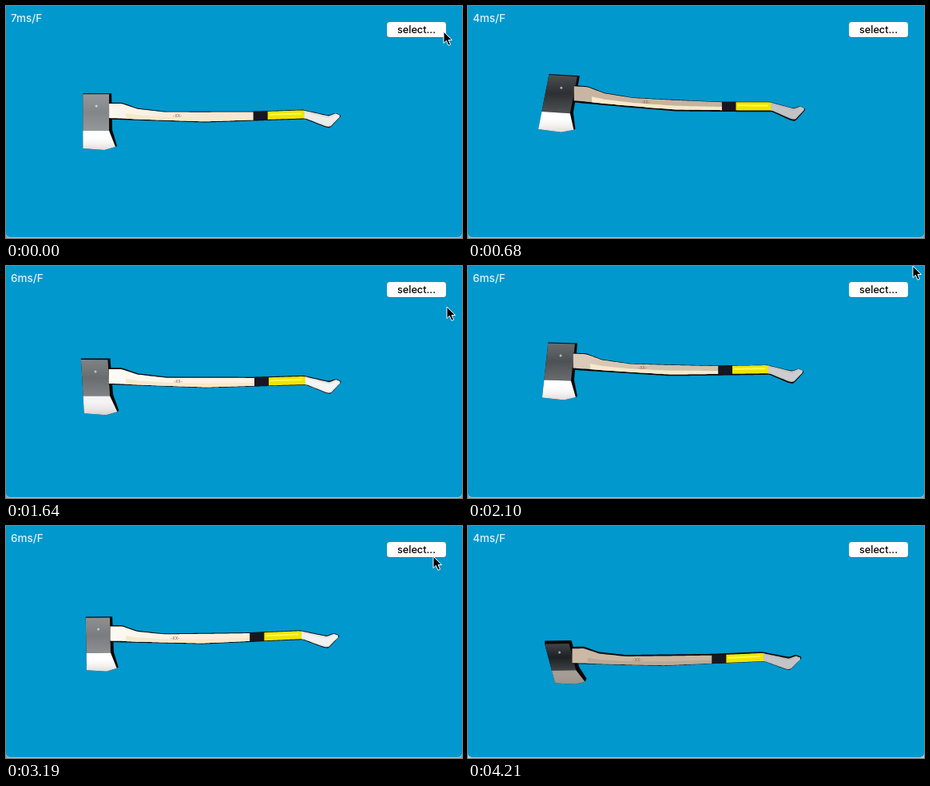
Animation, 571 px wide and 290 px high, one loop 4.26 s. Source, as an HTML page with a canvas:

```html
<!DOCTYPE html>
<html lang="en">
<head>
<meta charset="utf-8">
<title>Axe viewer</title>
<style>
  html, body { margin: 0; width: 100%; height: 100%; overflow: hidden; background: #8fa3ab; }
  #stage { position: relative; width: 571px; height: 290px; overflow: hidden; font: 500 13.5px/20px Inter, sans-serif; }
  #view { position: absolute; inset: 0 0 1px; background: #0098cd; border-radius: 0 0 5px 5px; box-shadow: 0 1px #b4c6ce; }
  canvas, svg { position: absolute; left: 0; top: 0; }
  #rate { position: absolute; left: 6px; top: 5px; color: #e2f3fa; }
  #select { position: absolute; left: 477px; top: 20px; width: 74px; height: 19px; border-radius: 3.5px;
    background: #fff; box-shadow: 0 .5px .5px #0005; color: #000; font-size: 12.7px; line-height: 19px; text-align: center; }
</style>
</head>
<body>
<div id="stage">
  <div id="view"></div>
  <canvas id="axe" width="571" height="290"></canvas>
  <div id="rate"></div>
  <div id="select">select...</div>
  <svg id="cursor" width="14" height="20" viewBox="-1 -1 14 20">
    <path d="M0 0V14.5L3.4 11.4L6 17.3L8.6 16.2L6.1 10.5H10.6Z" fill="#000" stroke="#fff"/>
  </svg>
</div>
<script>
const LOOP = 4260, STEP = 56.7;
const byId = id => document.getElementById(id);
const ctx = byId('axe').getContext('2d');

const clamp = (v, low = 0, high = 1) => Math.max(low, Math.min(high, v));
const mix = (a, b, k) => Array.isArray(a) ? a.map((v, i) => mix(v, b[i], k)) : a + (b - a) * k;
const rgb = hex => [0, 2, 4].map(i => parseInt(hex.substr(i, 2), 16));
const css = c => `rgb(${c.map(Math.round)})`;
const bump = (v, center, width) => Math.exp(-(((v - center) / width) ** 2));
const WHITE = rgb('ffffff');

// Key points of the pointer path: [step, [x, y]]. The axe turns with the pointer.
const pointer = [
  [0, [549, 32]], [11, [571, -30]], [13, [571, -30]], [20, [554, 46]], [25, [551, 74]], [29, [553, 51]],
  [37, [558, 0]], [40, [562, -18]], [49, [512, 19]], [59, [546, 46]], [63, [540, 111]], [69, [536, 295]]
];
const rates = [[0, 7], [11, 4], [18, 6], [45, 5], [55, 6], [68, 4]];

// Edges of the handle at rest, as [x, y].
const upper = [[129, 121], [145, 121], [165, 128], [200, 132], [310, 132], [372, 130], [404, 137], [413, 134], [419, 137]];
const lower = [[129, 141], [190, 143], [250, 145], [310, 143], [375, 141], [400, 151], [406, 152], [419, 138]];

function sample(table, at) {
  const next = table.findIndex(row => row[0] > at);
  if (next < 0) return table[table.length - 1][1];
  const [a, b] = [table[next - 1], table[next]];
  return mix(a[1], b[1], (at - a[0]) / (b[0] - a[0]));
}

function polygon(points, fill) {
  ctx.beginPath();
  points.forEach(p => ctx.lineTo(...p));
  ctx.closePath();
  ctx.fillStyle = fill;
  ctx.fill();
}

function gradient(x0, y0, x1, y1, ...colors) {
  const fill = ctx.createLinearGradient(x0, y0, x1, y1);
  colors.forEach((c, i) => fill.addColorStop(i / (colors.length - 1), css(c)));
  return fill;
}

// Pointer height sets how far the head drops, pointer x turns the axe.
function poseFor([x, y]) {
  const drop = 30 * Math.tanh((y - 32) / 78);
  return { drop, lift: Math.max(0, -drop), turn: (550 - x) / 38 };
}

function project({ drop, lift, turn }, x, y) {
  const u = (x - 129) / 290;
  return [
    x + turn * (4 - 57 * u + 48 * u * u) + .3 * lift * (1 - u) ** 2,
    y + drop + lift * (.7 * u - .3 * u * u) + turn * (3.5 - 9 * u)
  ];
}

function drawHandle(pose) {
  const { drop } = pose;
  const strip = (from, to, a, b, fill, above = 0, below = 0) => {
    const top = [], bottom = [];
    for (let x = from; ; x = Math.min(to, x + 3)) {
      const [t, l] = [sample(upper, x), sample(lower, x)];
      top.push(project(pose, x, mix(t, l, a) - above));
      bottom.unshift(project(pose, x, mix(t, l, b) + below));
      if (x === to) break;
    }
    polygon(top.concat(bottom), fill);
  };
  const glow = bump(drop, 6, 15);
  const wood = mix(rgb('c4b09b'), rgb('fbf2e0'), glow);
  const woodLow = mix(rgb('f6e9c9'), rgb('bba997'), clamp((drop - 8) / 22));
  const grip = mix(rgb('c0c0c2'), rgb('f4f4f4'), glow);

  strip(129, 419, 0, 1, '#080808', clamp(.3 + drop / 20, 0, 1.3), clamp(.6 - drop / 20, 0, 1.3));
  strip(129, 311, .05, .95, gradient(130, 0, 250, 0, mix(wood, WHITE, .7 * glow), wood));
  strip(150, 311, .58, .95, css(woodLow));
  strip(310, 329, 0, 1, '#18171f');
  strip(328, 376, .04, .96, '#efe500');
  strip(330, 370, .32, .5, '#fff84e');
  strip(374, 418, .04, .96, css(mix(grip, rgb('969696'), .2)));
  strip(374, 417, .2, .85, css(grip));
  ctx.fillStyle = '#8a6c4c';
  ctx.font = '6px Inter, sans-serif';
  ctx.fillText('-xx-', ...project(pose, 209, 139));
}

function drawHead(pose) {
  const { drop, turn } = pose;
  const dip = clamp(drop / 30), side = clamp(turn);
  const height = (1 - .25 * dip * dip) * (1 - .1 * side);
  const skew = .0085 * drop * (1 - drop / 120);
  const place = (x, y) => {
    const [px, py] = project(pose, x, 131 + (y - 131) * height);
    return [px + skew * (y - 131), py];
  };
  const [a, b, c, d, e, f, g] = [
    place(96, 110), place(129, 110), place(129, 156), place(137, 176),
    place(123, 180), place(96, 178), place(96, 156)
  ];
  const far = ([x, y], dx) => [x + dx, y - 1 - 3 * dip];
  polygon([far(a, 0), far(b, 3), far(c, 4), far(d, 2), d, e, f, a], '#070707');

  const level = 37 + 95 * bump(drop, 0, 13) - 45 * side * side;
  const steel = [level - 2, level + 2, level + 5];
  polygon([a, b, c, g], gradient(0, a[1], 0, g[1],
    mix(steel, WHITE, .15), steel, mix(steel, WHITE, .15)));

  const fade = clamp((drop - 5) / 20);
  const blade = mix(WHITE, rgb('a59c96'), fade);
  const lip = mix(blade, rgb('948b85'), .3 + .3 * fade);
  polygon([g, c, d, e, f], gradient(0, g[1], 0, e[1], blade, blade, mix(blade, lip, .35), lip));

  ctx.fillStyle = css(mix(steel, WHITE, .6));
  ctx.beginPath();
  ctx.arc(...place(113, 125), 1.5, 0, 7);
  ctx.fill();
}

function render(time) {
  const step = Math.floor(time / STEP + .1);
  const [x, y] = sample(pointer, step);
  const pose = poseFor([x, y]);
  ctx.clearRect(0, 0, 571, 290);
  drawHead(pose);
  drawHandle(pose);
  byId('cursor').style.transform = `translate(${Math.round(x) - 2}px, ${Math.round(y) - 1}px)`;
  byId('rate').textContent = `${rates.filter(row => row[0] <= step).pop()[1]}ms/F`;
  document.body.style.background = time < 4210 ? '#8fa3ab' : '#c3d0d5';
}

function tick() {
  render(performance.now() % LOOP);
  requestAnimationFrame(tick);
}
tick();
</script>
</body>
</html>
```
